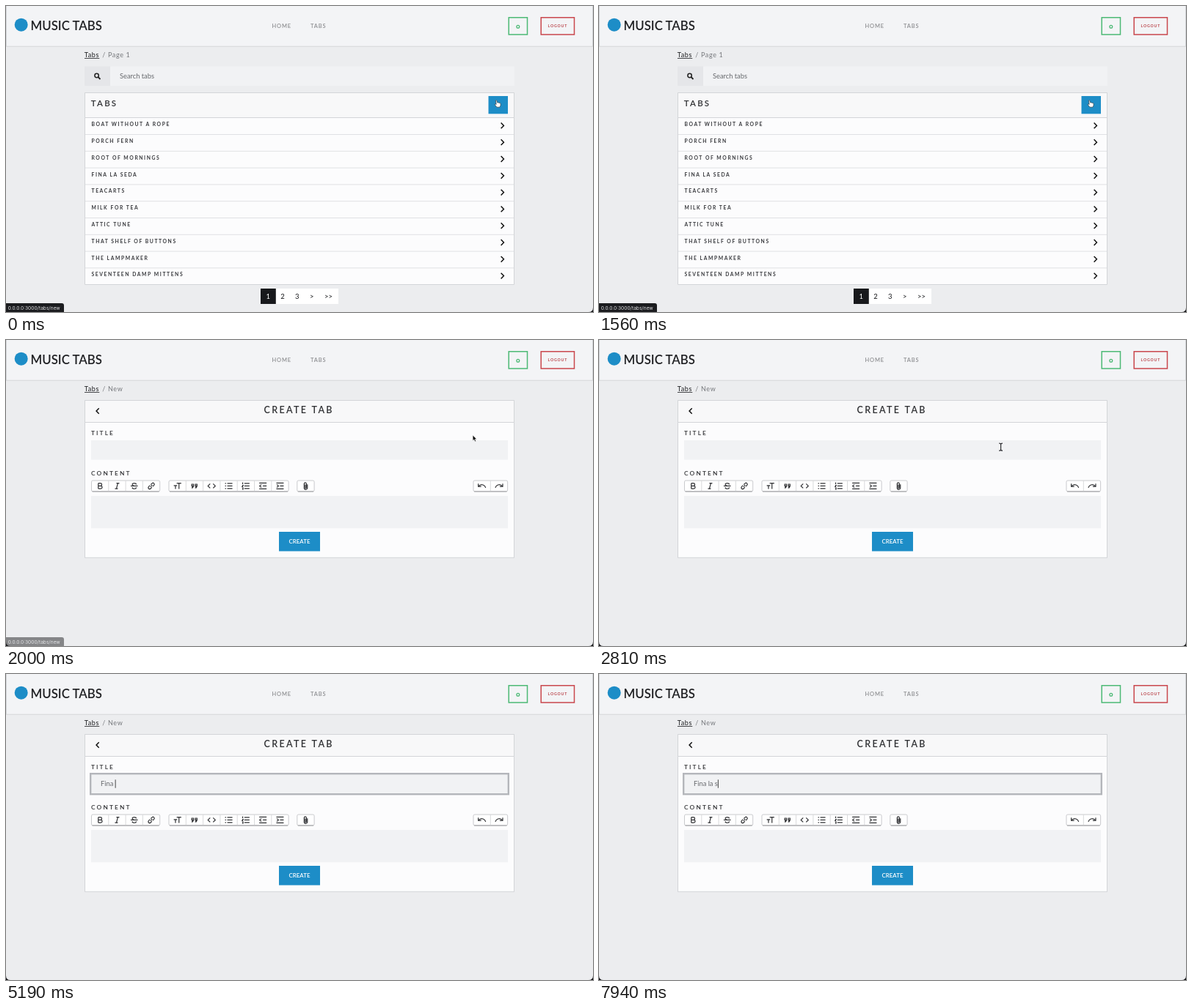
An HTML page that plays this animation: 800x418 px, repeating every 8 s.

```html
<!DOCTYPE html>
<html lang="en">
<head>
<meta charset="utf-8">
<title>Music tabs</title>
<style>
  html, body { margin: 0; width: 100%; height: 100%; overflow: hidden; background: #ecedef; }
  svg { display: block; width: 100vw; height: 100vh; font-family: Lato, sans-serif; fill: #2f3033; }
  text { white-space: pre; }
  .brand { font-size: 16.8px; font-weight: 600; fill: #202124; }
  .nav { font-size: 7.5px; font-weight: 600; letter-spacing: .8px; fill: #8d8e91; }
  .logout { font-size: 5.2px; font-weight: 700; letter-spacing: .85px; fill: #bb454b; }
  .crumb { font-size: 9px; letter-spacing: .6px; fill: #76787c; }
  .input { font-size: 9.3px; fill: #66686c; }
  .head { font-size: 11.5px; font-weight: 600; letter-spacing: 2.2px; }
  .big { font-size: 12.5px; letter-spacing: 2.35px; }
  .row { font-size: 6.8px; font-weight: 700; letter-spacing: 1.55px; fill: #393a3e; }
  .label { font-size: 8.4px; font-weight: 600; letter-spacing: 2.1px; }
  .button { font-size: 7.9px; font-weight: 600; fill: #fff; text-anchor: middle; }
  .page { font-size: 9.5px; text-anchor: middle; fill: #17181b; }
  .url { font: 6.6px Inter, sans-serif; fill: #dfe0e2; }
  .field { fill: #f1f2f4; }
  .blue { fill: #1d8dc7; }
  .edge { stroke: #d3d5d8; }
  .line { fill: none; stroke: #2f3033; stroke-width: 1.2; }
  .chevron { fill: none; stroke: #111; stroke-width: 1.5; }
</style>
</head>
<body>
<svg viewBox="0 0 800 418">
  <rect id="bar" class="edge" x=".5" y="-1" width="799" fill="#f3f4f6"/>
  <circle id="logo" class="blue" cx="20.7" cy="25.7" r="9"/>
  <text id="brand" class="brand" x="33.5" y="32.8">MUSIC TABS</text>
  <g id="nav" class="nav">
    <text x="362.5" y="29.8">HOME</text><text x="415" y="29.8">TABS</text>
  </g>
  <g id="actions">
    <g fill="none" stroke-width="1.5">
      <path stroke="#4cb975" d="M685.2 15.7h25.3v23.4h-25.3z"/>
      <circle stroke="#4cb975" stroke-width="1.3" cx="697.8" cy="28.2" r="1.9"/>
      <path stroke="#c9474d" d="M729.2 15.7h45.3v23.4h-45.3z"/>
    </g>
    <text class="logout" x="738.5" y="29">LOGOUT</text>
  </g>
  <g id="crumbs" class="crumb">
    <text x="106.8" y="69.7" fill="#1c1d20">Tabs</text>
    <path d="M107 71.5h20.3" stroke="#1c1d20" stroke-width=".8"/>
    <text x="131.3" y="69.7">/</text>
    <text id="crumb" x="139" y="69.7"></text>
  </g>

  <g id="list">
    <path fill="#e5e6e9" d="M107 82.5h35v26.5h-35z"/>
    <path class="field" d="M142 82.5h551v26.5h-551z"/>
    <circle cx="123.6" cy="95" r="2.7" fill="none" stroke="#222" stroke-width="1.5"/>
    <path d="M125.5 97l3 3" stroke="#222" stroke-width="1.8"/>
    <text class="input" x="155" y="98.8">Search tabs</text>
    <path class="edge" fill="#fcfcfd" d="M107.5 118.5h585v262h-585z"/>
    <path class="edge" fill="#f8f8f9" d="M107.5 118.5h585v34h-585z"/>
    <text class="head" x="115.8" y="136.6">TABS</text>
    <path class="blue" d="M657.5 123h26.5v24.3h-26.5z"/>
    <g id="rows"></g>
    <path fill="#fff" d="M347 386h106v21h-106z"/>
    <path fill="#17181b" d="M347 386h20.8v21h-20.8z"/>
    <g id="pages"></g>
    <path transform="translate(665.5 128.2)" fill="#fff" stroke="#2a3a44" stroke-width=".7"
      d="M1.8 .8q1-.9 1.6 .3l.6 2.7q1-.6 1.6 .2 1-.4 1.5 .4 1.2-.3 1.4 .8l.1 2.4-1.2 2.4h-4L.8 6.7q-.4-1.2 .8-1.1l1.1 .7z"/>
  </g>

  <g id="form">
    <rect id="card" class="edge" x="107.5" y="82.5" width="585" fill="#fcfcfd"/>
    <g id="upper">
      <path class="edge" fill="#f8f8f9" d="M107.5 82.5h585v30h-585z"/>
      <path id="back" class="chevron" d="M126.7 93.3l-3.6 3.7 3.6 3.7"/>
      <text class="head big" x="351.5" y="99.6">CREATE TAB</text>
      <text class="label" x="116" y="129.8">TITLE</text>
      <path class="field" d="M116 137h568v26.5h-568z"/>
      <rect id="ring" x="115.2" y="136.2" width="569.6" height="28" fill="none" stroke="#b4b6bb" stroke-width="2.4"/>
      <text id="typed" class="input" x="129" y="153" xml:space="preserve"></text>
      <rect id="caret" y="144.3" width=".9" height="11.4" fill="#333"/>
      <text class="label" x="116" y="184.9">CONTENT</text>
    </g>
    <g id="tools"></g>
    <g id="lower">
      <path class="field" d="M116 213h568v44.3h-568z"/>
      <path class="blue" d="M372 262h56v26.6h-56z"/>
      <text class="button" x="400" y="278">CREATE</text>
    </g>
    <path id="arrow" fill="#111" stroke="#fff" stroke-width=".5" d="M0 0v7.4l1.7-1.5 1.3 2.8 1.3-.6-1.2-2.6h2.2z"/>
    <path id="beam" class="line" stroke-width=".9" d="M-2.4-5q2.4 0 2.4 1.4v7.2q0 1.4-2.4 1.4M2.4-5q-2.4 0-2.4 1.4v7.2q0 1.4 2.4 1.4"/>
  </g>

  <path d="M0 412q0 6 6 6h-6zM800 412q0 6-6 6h6z" fill="#101114"/>
  <g id="status">
    <path d="M0 406h76q3 0 3 3v9h-79z" fill="#1b1c1f"/>
    <text class="url" x="2.8" y="414.6">0.0.0.0:3000/tabs/new</text>
  </g>
</svg>
<script>
const $ = id => document.getElementById(id);
const LOOP = 8000, OPENED = 1630, STYLED = 1690;

const titles = ["BOAT WITHOUT A ROPE", "PORCH FERN", "ROOT OF MORNINGS", "FINA LA SEDA", "TEACARTS",
  "MILK FOR TEA", "ATTIC TUNE", "THAT SHELF OF BUTTONS", "THE LAMPMAKER", "SEVENTEEN DAMP MITTENS"];
$("rows").innerHTML = titles.map((title, i) => `<g transform="translate(0 ${i * 22.8})">
  ${i ? '<path stroke="#e0e1e4" d="M108 152.7h584"/>' : ""}
  <text class="row" x="116.5" y="164.2">${title}</text>
  <path class="chevron" d="M674.6 159.5l3.8 3.9-3.8 3.9"/></g>`).join("");

$("pages").innerHTML = [["1", 357.3], ["2", 377], ["3", 396.8], ["&gt;", 416.8], ["&gt;&gt;", 439.5]]
  .map(([label, x], i) => `<text class="page" x="${x}" y="399.8" ${i ? "" : 'style="fill:#fff"'}>${label}</text>`).join("");

// Toolbar icons are centred on 0,0
const lines = "M-2-3.5H5M-2 0H5M-2 3.5H5", indentLines = "M-5-4H5M0 0H5M-5 4H5";
const quote = x => `M${x}-2.4h2.4v2.6l-1.2 2.2h-.8l1-2.4h-1.4z`;
const undo = "M-5-3.2V.8H-1M-4.7 .6C-2-3 3.5-2.5 5 2.5", redo = "M5-3.2V.8H1M4.7 .6C2-3-3.5-2.5-5 2.5";
const groups = [
  [116.5, [
    "M-2.4-3.7V3.7M-2.4-3.7H.6a1.8 1.8 0 0 1 0 3.6H-2.4M0-.1H1a1.9 1.9 0 0 1 0 3.8H-2.4",
    "M-1-3.7H3M-3 3.7H1M1-3.7L-1 3.7",
    "M-4.8 0H4.8M2.8-2C2.5-4.5-2.8-4.5-2.6-2C-2.4-.8-1-.4 0 0M-2.8 2C-2.5 4.5 3 4.5 2.7 1.8",
    "M-.8-1.8L1-3.6a1.8 1.8 0 0 1 2.6 2.6L1.8 .8M.8 1.8L-1 3.6a1.8 1.8 0 0 1-2.6-2.6L-1.8-.8M-1.2 1.2L1.2-1.2"]],
  [222, [
    "M-1-3.7H5.2M2.1-3.7V4M-5-.6H-.4M-2.7-.6V4",
    quote(-3.8) + quote(1),
    "M-2-3L-5 0L-2 3M2-3L5 0L2 3",
    lines + "M-5-3.5h1.4M-5 0h1.4M-5 3.5h1.4",
    lines + "M-4.3-4.8v2.4M-5-.9h1.3l-1.3 1.8h1.3M-5 2.6h1.2v1.9h-1.2",
    indentLines + "M-2-2L-4.5 0L-2 2",
    indentLines + "M-4.5-2L-2 0L-4.5 2"]],
  [396.8, ["M2.3-2.2V2.5a2.2 2.2 0 0 1-4.4 0V-3a1.5 1.5 0 0 1 3 0V2.2a.7 .7 0 0 1-1.5 0V-2"]],
  [637, [undo, redo]]
];
$("tools").innerHTML = groups.map(([x, icons]) => {
  const step = 23.3, width = icons.length * step;
  return `<g transform="translate(${x} 192)">
    <rect width="${width}" height="14.8" rx="1.8" fill="#fff" stroke="#bcbdc0" stroke-width=".8"/>
    <path d="M1 15h${width - 2}" stroke="#8b8c8f" stroke-width=".8"/>` +
    icons.map((d, i) => `<path d="M${i * step} .4v14" stroke="#cfd0d2" stroke-width="${i ? .8 : 0}"/>
      <path class="line" transform="translate(${(i + .5) * step} 7.4)" d="${d}"/>`).join("") + "</g>";
}).join("");

// Time, number of characters typed, caret shown
const phrase = "Fina la s";
const typing = [[0, 0, 0], [2940, 0, 1], [3310, 0, 0], [3690, 1, 1], [3940, 2, 1], [4440, 2, 0], [4560, 3, 1],
  [4880, 4, 1], [5190, 5, 1], [5690, 5, 0], [6060, 6, 1], [6190, 7, 1], [6560, 8, 1], [7060, 8, 0], [7560, 8, 1], [7940, 9, 1]];

const clamp = v => Math.max(0, Math.min(1, v));
const show = (id, on) => $(id).setAttribute("visibility", on ? "inherit" : "hidden");
const move = (id, x, y) => $(id).setAttribute("transform", `translate(${x} ${y})`);

function pointer(t) {
  const a = clamp((t - 1750) / 250), b = clamp((t - 2000) / 880);
  const eased = b * (1.4 - .4 * b);
  return [667.2 - 30.9 * a - 93.3 * eased, 128.8 + 1.2 * a + 17 * eased];
}

function draw(t) {
  const open = t >= OPENED, bare = open && t < STYLED;
  show("list", !open);
  show("form", open);
  show("logo", !bare);
  show("back", !bare);
  show("tools", !bare);
  $("crumb").textContent = open ? "New" : "Page 1";

  // Without the icon font the header is taller and the toolbar is missing
  $("bar").setAttribute("height", bare ? 59.7 : 56.2);
  move("brand", bare ? -22 : 0, bare ? 2 : 0);
  move("nav", bare ? -11.4 : 0, bare ? 1.8 : 0);
  move("actions", 0, bare ? 1.7 : 0);
  for (const id of ["crumbs", "upper", "card"]) move(id, 0, bare ? 3.5 : 0);
  $("card").setAttribute("height", bare ? 193.5 : 214.8);
  move("lower", 0, bare ? -18 : 0);

  const [x, y] = pointer(t), overInput = y > 137;
  move("arrow", x, y);
  move("beam", x, y);
  show("arrow", !overInput);
  show("beam", overInput && t < 3690);

  const [, count, caretOn] = typing.findLast(([start]) => t >= start);
  $("typed").textContent = phrase.slice(0, count);
  $("caret").setAttribute("x", 129 + (count ? $("typed").getComputedTextLength() : 0));
  show("caret", caretOn);
  show("ring", t >= 2940);
  $("status").setAttribute("opacity", clamp((2060 - t) / 120));
}

function tick() {
  draw(performance.now() % LOOP);
  requestAnimationFrame(tick);
}
tick();
</script>
</body>
</html>
```
